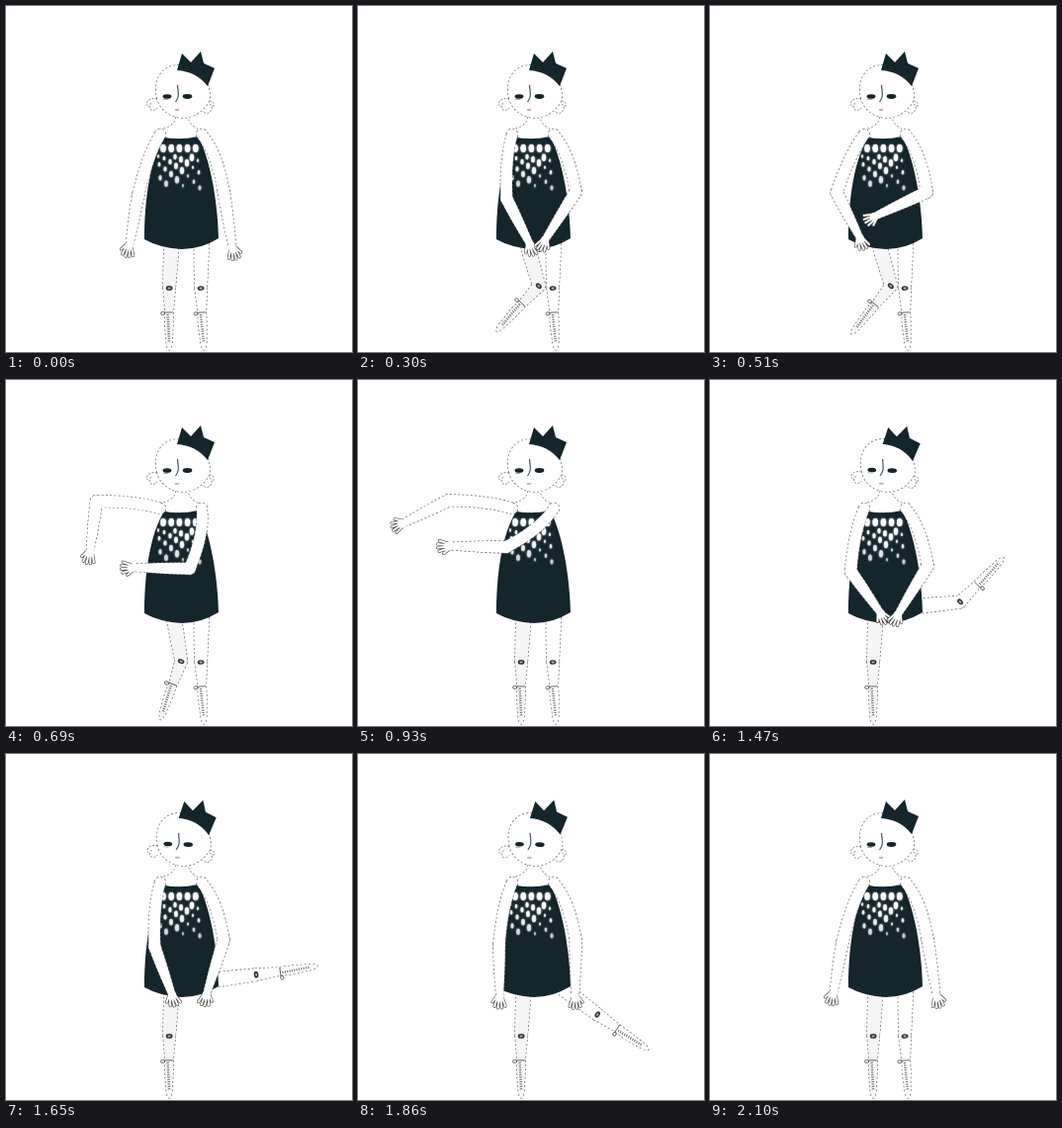
Recreate the animation shown at these times as an HTML page with a canvas. Size 350 by 350 pixels, loop 2.16 s.

```html
<!DOCTYPE html>
<html lang="en">
<head>
<meta charset="utf-8">
<title>Paper doll dance</title>
<style>
html, body { margin: 0; width: 100%; height: 100%; overflow: hidden; background: #fff; }
canvas { display: block; }
</style>
</head>
<body>
<canvas id="stage" width="350" height="350"></canvas>
<script>
const ctx = document.getElementById('stage').getContext('2d');
const LOOP = 2160, STEP = 30, RAD = Math.PI / 180;
const INK = '#14252b', LINE = '#666', SKIN = '#fff', SHADE = '#f5f5f5';

const DRESS = new Path2D('M160 133Q177 136 194 132C204 148 214 190 215 235Q197 246 178 246Q156 245 140 236C140 195 146 155 160 133Z');
const NECK = new Path2D('M172 108Q174 121 157 125L163 134H194L198 126Q182 121 184 108Z');
const HEAD = new Path2D('M153 94C148 73 159 60 174 60C195 60 208 78 206 95C200 107 189 113 179 113C168 113 156 106 153 94Z');
const CURLS = new Path2D('M153 94C145 92 141 97 143 101M147 98C142 103 148 109 153 103M202 97C209 94 212 99 209 102M206 99C212 104 204 113 199 106');
const CROWN = new Path2D('M173 65L178 48L187 57L197 46L200 58L211 63L204 81Q192 66 173 65Z');
const NOSE = new Path2D('M173.5 80C174 88 176 91 171.5 97');
const SHIN = new Path2D('M-6.2 0L-4 25L-4.5 36L-2.8 57Q0 69 2.8 57L4 36L4 25L6.2 0A6.2 6.2 0 0 0-6.2 0Z');

const legAt = x => ({ x, y: 230, first: limb(55, 7.5, 6.2), length: 55, second: SHIN, detail: shoe });
const armAt = (x, side, upper, wrist) => ({
  x, y: 130, first: limb(upper, 5.5, 6, side), length: upper,
  second: limb(wrist, 6, 3.8), detail: () => hand(wrist, side < 0 ? -1 : 1)
});
const LEFT_LEG = legAt(168), RIGHT_LEG = legAt(198);
const LEFT_ARM = armAt(156, -5, 65, 48), RIGHT_ARM = armAt(198, 8, 62, 54);

// hanging limb, tapered, with an optional sideways bow
function limb(length, top, end, bow = 0) {
  const p = new Path2D(), y = length * 0.38;
  p.arc(0, 0, top, Math.PI, 0);
  p.quadraticCurveTo(top + bow, y, end, length);
  p.arc(0, length, end, 0, Math.PI);
  p.quadraticCurveTo(bow - top, y, -top, 0);
  return p;
}

function ease(t, from, to) {
  const u = Math.min(1, Math.max(0, (t - from) / (to - from)));
  return u * u * (3 - 2 * u);
}

// all angles in degrees from hanging, positive towards the left
function poseAt(t) {
  const pulse = (a, b, c, d) => ease(t, a, b) - ease(t, c, d);
  const kick = pulse(1080, 1500, 1650, 2100);
  return {
    leftArm: [
      20 - 15 * pulse(0, 300, 1650, 2100) + 94 * pulse(420, 720, 900, 1260) + 16 * pulse(930, 1260, 1260, 1650),
      10 - 37 * pulse(0, 300, 540, 720) + 68 * pulse(690, 840, 840, 1140) - 54 * pulse(1080, 1260, 1260, 2100)
    ],
    rightArm: [
      -21 + 72 * pulse(480, 930, 930, 1260),
      -9 + 48 * pulse(0, 390, 1260, 2100) + 52 * pulse(330, 690, 930, 1260)
    ],
    leftLeg: [3 - 19 * pulse(0, 300, 540, 930), 43 * pulse(0, 300, 420, 930)],
    rightLeg: [1 - 98 * kick, -3 - 95 * kick - 103 * pulse(1080, 1260, 1260, 1620)],
    tilt: 2 * kick
  };
}

function at(x, y, angle, draw) {
  ctx.save();
  ctx.translate(x, y);
  ctx.rotate(angle * RAD);
  draw();
  ctx.restore();
}

function line(path, color, width, dash = []) {
  ctx.setLineDash(dash);
  ctx.lineWidth = width;
  ctx.strokeStyle = color;
  ctx.stroke(path);
}

const outline = path => line(path, LINE, 1.4, [2, 2.2]);

function fill(path, color) {
  ctx.fillStyle = color;
  ctx.fill(path);
}

function oval(x, y, rx, ry, color) {
  ctx.beginPath();
  ctx.ellipse(x, y, rx, ry, 0, 0, 7);
  ctx.fillStyle = color;
  ctx.fill();
}

// two parts sharing one silhouette: all outlines first, then all fills
function jointed({ x, y, first, length, second, detail }, [a, b], color = SKIN) {
  const jx = x - Math.sin(a * RAD) * length, jy = y + Math.cos(a * RAD) * length;
  for (const paint of [outline, p => fill(p, color)]) {
    at(x, y, a, () => paint(first));
    at(jx, jy, b, () => paint(second));
  }
  at(jx, jy, b, detail);
}

function hand(wrist, side) {
  const p = new Path2D();
  for (let i = -1.5; i < 2; i++) {
    p.moveTo(i * 1.6, wrist + 4);
    p.lineTo(i * 3.6, wrist + 16 - Math.abs(i) * 1.6);
  }
  p.moveTo(side * 2, wrist + 2);
  p.lineTo(side * 7.5, wrist + 9);
  ctx.lineCap = 'round';
  line(p, '#444', 3.2);
  line(p, SKIN, 2);
  ctx.lineCap = 'butt';
  oval(0, wrist + 4, 4.2, 5, SKIN);
}

function shoe() {
  oval(0, 0.5, 3.4, 2.3, '#333');
  oval(0, 0.5, 1.6, 0.9, '#bbb');
  line(new Path2D('M-5 25H4M-4.5 26a2 1.6 0 1 0-4 0a2 1.6 0 1 0 4 0'), '#555', 0.9);
  line(new Path2D('M-1.5 27L0 55'), '#666', 2.4, [1, 1.4]);
}

function dress() {
  fill(DRESS, INK);
  ctx.save();
  ctx.clip(DRESS);
  ctx.shadowColor = '#fff';
  ctx.shadowBlur = 2;
  for (let i = 0; i < 5; i++) oval(159 + 8.2 * i, 144, 2.8, 4, SKIN);
  // scattered drops thin out and fade downwards
  for (let i = 0; i < 22; i++) {
    const depth = (i / 22) ** 1.4, size = 1 + i * 7 % 5 * 0.3;
    oval(154 + i * 17 % 45, 152 + 34 * depth, size, size * 1.7, `rgba(255,255,255,${0.95 - 0.4 * depth})`);
  }
  ctx.restore();
}

function head() {
  ctx.translate(-178, -113);
  line(CURLS, LINE, 0.8, [2, 1.5]);
  outline(HEAD);
  fill(HEAD, SKIN);
  fill(CROWN, INK);
  oval(163, 91.5, 4.4, 2.3, INK);
  oval(183.5, 91.5, 4.8, 2.4, INK);
  line(NOSE, '#45535a', 1.2);
  ctx.fillStyle = '#aaa';
  ctx.fillRect(159, 94, 5, 1);
  oval(173, 105, 2.6, 1, '#b5b5b5');
}

function frame(now) {
  const pose = poseAt(Math.floor(now % LOOP / STEP) * STEP);
  ctx.fillStyle = '#fff';
  ctx.fillRect(0, 0, 350, 350);
  jointed(LEFT_LEG, pose.leftLeg, SHADE);
  jointed(RIGHT_LEG, pose.rightLeg);
  outline(NECK);
  fill(NECK, SKIN);
  dress();
  jointed(LEFT_ARM, pose.leftArm);
  jointed(RIGHT_ARM, pose.rightArm);
  at(178, 113, pose.tilt, head);
  requestAnimationFrame(() => frame(performance.now() - start));
}

const start = performance.now();
frame(0);
</script>
</body>
</html>
```
